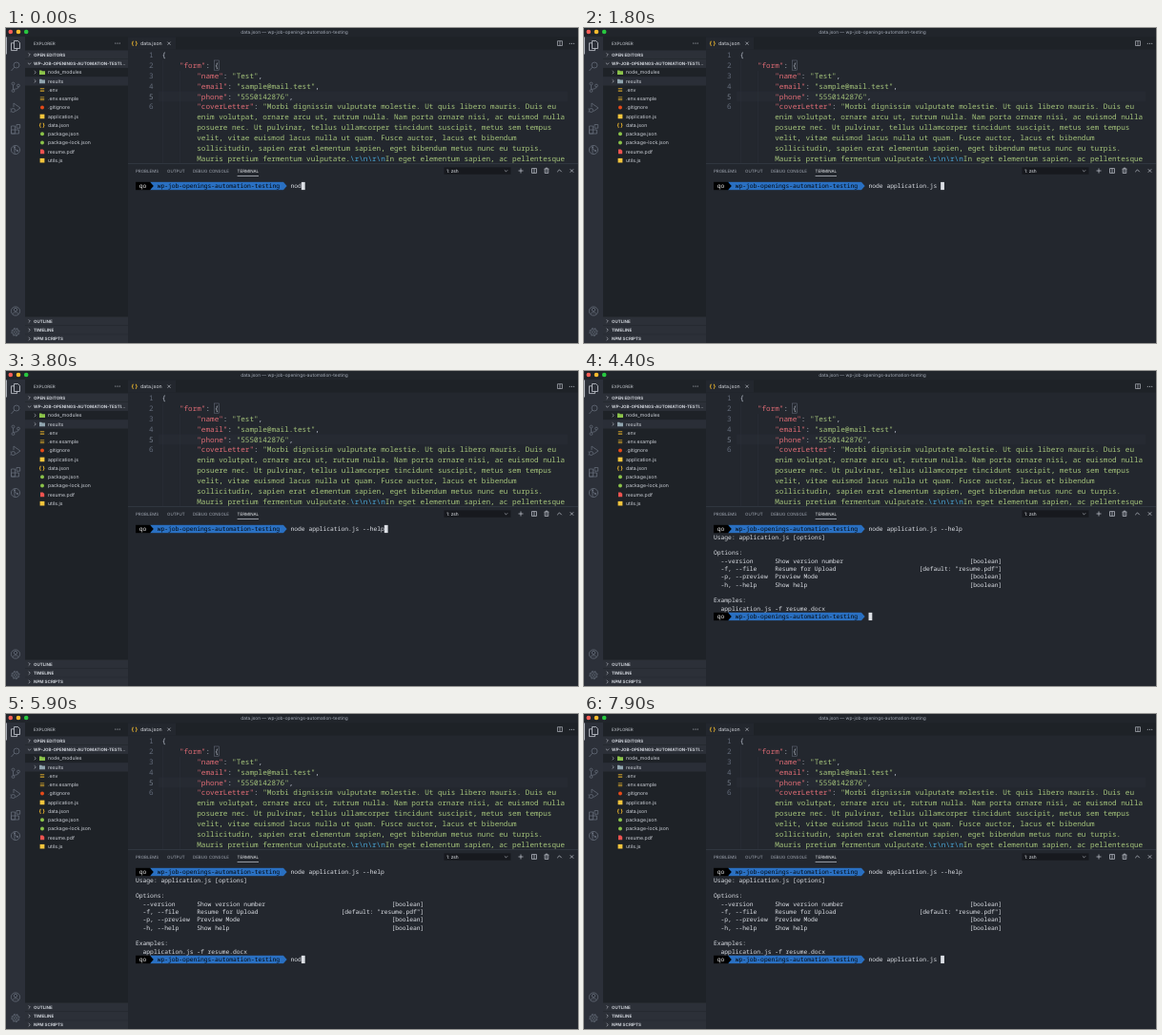
An HTML page that plays this animation: 600x331 px, repeating every 8000 ms.

```html
<!DOCTYPE html>
<html lang="en">
<head>
<meta charset="utf-8">
<title>Terminal session</title>
<style>
  html, body { margin: 0; width: 100%; height: 100%; overflow: hidden; background: #23272e; }
  svg { display: block; width: 600px; height: 331px; }
  text { white-space: pre; text-rendering: geometricPrecision; font: 5.15px Inter, sans-serif; fill: #cdd1d8; }
  .head { font-size: 4.5px; font-weight: 700; }
  .tab { font-size: 4.45px; }
  .code { font: 7.66px "Noto Sans Mono", monospace; fill: #b4bac6; }
  .term { font: 6.3px "Noto Sans Mono", monospace; fill: #dcdfe5; }
  .icon { fill: none; stroke: #646b78; stroke-width: .8; }
  .lit { stroke: #c8ccd4; }
  .key { fill: #e06c75; }
  .str { fill: #a5c47b; }
  .esc { fill: #4aa8d8; }
</style>
</head>
<body>
<svg id="stage" viewBox="0 0 600 331"></svg>
<script>
const COL = 3.78, LEFT = 136, ROW = 8.36, TOP = 166;
const rect = (x, y, w, h, fill, more = '') =>
  `<rect x="${x}" y="${y}" width="${w}" height="${h}" fill="${fill}" ${more}/>`;
const dot = (x, y, r, fill) => `<circle cx="${x}" cy="${y}" r="${r}" fill="${fill}"/>`;
const text = (x, y, s, cls = '', more = '') => `<text x="${x}" y="${y}" class="${cls}" ${more}>${s}</text>`;
const icon = (d, cls = '', more = '') => `<path d="${d}" class="icon ${cls}" ${more}/>`;
const span = (cls, s) => `<tspan class="${cls}">${s}</tspan>`;
const dots = (x, y) => [-2.2, 0, 2.2].map(d => dot(x + d, y, .55, '#c8ccd4')).join('');

function frame() {
  return rect(0, 0, 600, 331, '#23272e')
    + rect(0, 0, 600, 10, '#21252b')
    + dot(4.8, 4, 2.3, '#ff5f57') + dot(13, 4, 2.3, '#febc2e') + dot(21.2, 4, 2.3, '#28c840')
    + text(302.5, 5.5, 'data.json — wp-job-openings-automation-testing', '',
        'text-anchor="middle" style="font-size:4.8px;fill:#a6adb9"')
    + rect(0, 9, 20, 322, '#2c3039') + rect(20, 9, 108, 322, '#1e2227');
}

function activityBar() {
  const ring = (x, y, r) => `M${x - r} ${y}a${r} ${r} 0 1 0 ${2 * r} 0a${r} ${r} 0 1 0 ${-2 * r} 0`;
  return rect(0, 9.5, .8, 18, '#c8ccd4')
    + icon('M8.5 13.5h4l2 2v6h-6zM8.5 15.8h-3v7.8h6v-2', 'lit')
    + icon(ring(11, 39, 3) + 'M8.8 41.2L5.5 45')
    + icon(ring(7.5, 58.5, 1.4) + ring(7.5, 66, 1.4) + ring(13, 60.5, 1.4) + 'M7.5 60v4.5M13 62c0 2-3 2-5.5 2.5')
    + icon('M8 79l7 5-5 3.5M8 79v4' + ring(7.5, 86.5, 2) + 'M4.5 85h1M4.5 88h1')
    + icon('M5.5 103h4v8h-4zM5.5 107h8v4h-8zM11 101.5h3.7v3.7h-3.7z')
    + icon(ring(10, 128, 4.6) + 'M9 124v8M9 127l3 2') + dot(9, 125.5, 1, '#646b78') + dot(12, 129, 1, '#646b78')
    + icon(ring(10, 297.5, 4.6) + ring(10, 296, 1.7) + 'M6.8 300.5q3.2-3.5 6.4 0')
    + icon(ring(10, 319.5, 1.5) + ring(10, 319.5, 3.4))
    + icon(ring(10, 319.5, 4.2), '', 'stroke-dasharray="1.6 1.7"');
}

function chevron(x, y, open) {
  return icon(open ? `M${x - 1.6} ${y - .8}l1.6 1.6 1.6-1.6` : `M${x - .8} ${y - 1.6}l1.6 1.6-1.6 1.6`,
    'lit', 'style="stroke-width:.6"');
}

const braces = (x, y) => text(x, y, '{ }', '', 'style="fill:#fbc02d;font-weight:700;font-size:5.6px"');

function sidebar() {
  const files = [
    ['node_modules', '#8bc34a'], ['results', '#90a4ae'], ['.env', '#fbc02d'], ['.env.example', '#fbc02d'],
    ['.gitignore', '#e64a19'], ['application.js', '#f5c63c'], ['data.json', '{}'], ['package.json', '#8bc34a'],
    ['package-lock.json', '#8bc34a'], ['resume.pdf', '#ef5350'], ['utils.js', '#f5c63c']
  ];
  const mark = (name, color, y) => {
    if (color == '{}') return braces(34.4, y + 1.8);
    if (/modules|results/.test(name))
      return chevron(30.5, y) + `<path d="M35 ${y - 2.1}h2.2l.8.8h3v3.6h-6z" fill="${color}"/>`;
    if (name == '.gitignore') return dot(38, y, 2, color);
    if (name.startsWith('.env'))
      return [-1.5, 0, 1.5].map(d => rect(35.8, y + d - .3, 4.4, .6, color)).join('');
    if (name.endsWith('.pdf')) return `<path d="M36 ${y - 2.4}h2.7l1.5 1.5v3.4h-4.2z" fill="${color}"/>`;
    if (name.startsWith('package')) return dot(38, y, 2, color);
    return rect(35.6, y - 2.2, 4.8, 4.6, color);
  };
  const head = (y, s, open) => rect(20, y - 4.5, 108, 9, '#2c3038')
    + chevron(24.5, y, open) + text(29, y + 1.7, s, 'head');
  return text(29, 17.9, 'EXPLORER', 'tab') + dots(117, 16)
    + head(28, 'OPEN EDITORS') + head(37.4, 'WP-JOB-OPENINGS-AUTOMATION-TESTI…', true)
    + rect(20, 51.2, 108, 9.3, '#2a2e37')
    + files.map(([name, color], i) => {
        const y = 46.6 + i * 9.25;
        return mark(name, color, y) + text(44, y + 1.8, name);
      }).join('')
    + ['OUTLINE', 'TIMELINE', 'NPM SCRIPTS'].map((s, i) => head(308 + i * 9.3, s)).join('');
}

function editor() {
  const pair = (key, value) => span('key', `        "${key}"`) + ': ' + span('str', `"${value}"`) + ',';
  const prose = [
    'enim volutpat, ornare arcu ut, rutrum nulla. Nam porta ornare nisi, ac euismod nulla',
    'posuere nec. Ut pulvinar, tellus ullamcorper tincidunt suscipit, metus sem tempus',
    'velit, vitae euismod lacus nulla ut quam. Fusce auctor, lacus et bibendum',
    'sollicitudin, sapien erat elementum sapien, eget bibendum metus nunc eu turpis.',
    'Mauris pretium fermentum vulputate.' + span('esc', '\\r\\n\\r\\n')
      + 'In eget elementum sapien, ac pellentesque'
  ];
  const lines = [
    '{', span('key', '    "form"') + ': {', pair('name', 'Test'), pair('email', 'sample@mail.test'),
    pair('phone', '5550142876'),
    span('key', '        "coverLetter"') + ': '
      + span('str', '"Morbi dignissim vulputate molestie. Ut quis libero mauris. Duis eu'),
    ...prose.map(s => span('str', '        ' + s))
  ];
  return rect(128, 9.5, 472, 13, '#1e2227') + rect(128, 9.5, 50, 13, '#23272e')
    + braces(131.5, 18)
    + text(141, 18, 'data.json', '', 'style="fill:#d7dae0;font-size:5.25px"')
    + icon('M169.4 14.6l3.2 3.2M172.6 14.6l-3.2 3.2', 'lit', 'style="stroke-width:.6"')
    + icon('M578.5 13.7h5v4.8h-5zM581 13.7v4.8', 'lit', 'style="stroke-width:.6"') + dots(593.5, 16.2)
    + rect(160, 66.6, 429, 10.6, '#262a32')
    + rect(164, 34, .4, 108, '#2f343d') + rect(182.2, 45, .4, 97, '#2f343d')
    + rect(218.4, 34, 5, 10.2, 'none', 'stroke="#6b7280" stroke-width=".5"')
    + lines.map((s, i) => {
        const y = 31 + i * 10.88;
        const num = i < 6 ? text(150, y, i + 1, 'code', `style="fill:${i == 4 ? '#78808e' : '#626a79'}"`) : '';
        return num + text(163.5, y, s, 'code');
      }).join('');
}

function panel() {
  const tabs = [[136, 'PROBLEMS'], [169, 'OUTPUT'], [196, 'DEBUG CONSOLE'], [242.6, 'TERMINAL']];
  return rect(128, 142, 472, 189, '#23272e') + rect(128, 142, 472, .6, '#3a404b')
    + tabs.map(([x, s], i) => text(x, 151.7, s, 'tab', `style="fill:${i == 3 ? '#f0f2f5' : '#a3a9b4'}"`)).join('')
    + rect(242.6, 155, 22.4, .7, '#c8ccd4')
    + rect(459.5, 146.4, 70, 7.4, '#17191e')
    + text(462, 151.8, '1: zsh', '', 'style="font-size:4.8px;fill:#e4e7ec"') + chevron(524.5, 150.1, true)
    + icon('M537.5 150h5M540 147.5v5M551.5 147.6h5v4.8h-5zM554 147.6v4.8'
        + 'M564.5 148.2h5M566 148v-.8h2v.8M565.2 148.5v4h3.6v-4M567 149.3v2.3'
        + 'M578.2 151.2l2.3-2.3 2.3 2.3M591.8 148.3l3.4 3.4M595.2 148.3l-3.4 3.4', 'lit', 'style="stroke-width:.7"');
}

const line = (row, s, col = 0, fill = '') =>
  text(LEFT + col * COL, TOP + row * ROW + 2.2, s, 'term', fill && `style="fill:${fill};font-weight:500"`);

function prompt(row) {
  const y = TOP + row * ROW - ROW / 2, x = col => LEFT + col * COL;
  const arrow = (col, fill) =>
    `<path d="M${x(col) - .1} ${y}l${COL} ${ROW / 2}l${-COL} ${ROW / 2}z" fill="${fill}"/>`;
  return rect(x(4), y, 37 * COL, ROW, '#2a70c2') + arrow(41, '#2a70c2')
    + rect(x(0), y, 4 * COL, ROW, '#000') + arrow(4, '#000')
    + line(row, 'qo', 1, '#f0f0f0') + line(row, 'wp-job-openings-automation-testing', 6, '#05080c');
}

function help() {
  const options = [
    ['--version', 'Show version number', '[boolean]'],
    ['-f, --file', 'Resume for Upload', '[default: "resume.pdf"]'],
    ['-p, --preview', 'Preview Mode', '[boolean]'],
    ['-h, --help', 'Show help', '[boolean]']
  ];
  return line(1, 'Usage: application.js [options]') + line(3, 'Options:')
    + options.map(([flag, about, type], i) =>
        line(4 + i, flag, 2) + line(4 + i, about, 17) + line(4 + i, type, 80 - type.length)).join('')
    + line(9, 'Examples:') + line(10, 'application.js -f resume.docx', 2) + prompt(11);
}

const stage = document.getElementById('stage');
stage.innerHTML = frame() + activityBar() + sidebar() + editor() + panel() + prompt(0)
  + `<g id="first">${line(0, '', 43)}</g><g id="help">${help()}${line(11, '', 43)}</g>`
  + rect(0, 0, COL, 8.2, '#dcdfe5', 'id="cursor"');
const helpBox = document.getElementById('help');
const inputs = [document.querySelector('#first text'), helpBox.lastElementChild];
const cursor = document.getElementById('cursor');

// Each entry: time in ms, typed text so far; the file name is tab-completed.
const RUN = 'node application.js ', ENTER = 4300;
const typed = [
  [[0, 'nod'], [100, 'node'], [300, 'node '], [500, 'node a'], [700, 'node ap'], [800, 'node app'], [1100, RUN],
   [2700, RUN + '-'], [2900, RUN + '--'], [3200, RUN + '--h'], [3400, RUN + '--he'],
   [3500, RUN + '--hel'], [3700, RUN + '--help']],
  [[0, ''], [5600, 'n'], [5800, 'no'], [5900, 'nod'], [6000, 'node'], [6200, 'node '], [6400, 'node a'],
   [6600, 'node ap'], [6700, 'node app'], [7000, RUN]]
];

function draw() {
  const t = performance.now() % 8000;
  const now = typed.map(keys => keys.findLast(k => k[0] <= t)[1]);
  const active = t >= ENTER ? 1 : 0;
  inputs.forEach((input, i) => { input.textContent = now[i]; });
  helpBox.setAttribute('visibility', active ? 'visible' : 'hidden');
  cursor.setAttribute('x', LEFT + (43 + now[active].length) * COL);
  cursor.setAttribute('y', TOP + active * 11 * ROW - 4.1);
  requestAnimationFrame(draw);
}
draw();
</script>
</body>
</html>
```
